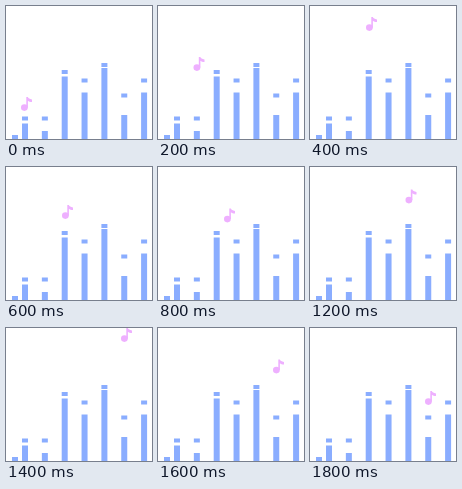
Write an HTML page that moves like this. It is 146 px wide and 133 px high and loops after 2000 ms.

```html
<!DOCTYPE html>
<html lang="en">
<head>
<meta charset="utf-8">
<title>Hopping note</title>
<style>
  html, body { margin: 0; width: 100%; height: 100%; overflow: hidden; background: #fff; }
  svg { display: block; width: 100%; height: 100%; }
  #bars { fill: #8aadff; }
  #note { fill: #eeb0ff; }
</style>
</head>
<body>
<svg viewBox="0 0 146 133">
  <g id="bars"></g>
  <g id="note">
    <ellipse cx="3.4" cy="10.6" rx="3.4" ry="3.3"/>
    <path d="M5.3 0H6.9C7.3 1.3 8.6 2.1 11 2.4V5C9.2 4.9 7.7 4.5 6.9 3.7V10.6H5.3Z"/>
  </g>
</svg>
<script>
  const FLOOR = 133, BAR = 6, CAP = 4, PITCH = 19.85;
  const STEP = 200, STEPS = 10;

  const tops = [117.5, 125, 70.5, 86.5, 62, 109, 86.5];
  const caps = [110.5, 110.5, 64, 72.5, 57, 87.5, 72.5];

  // corners of the route: the note moves straight between them
  const route = [
    { at: 0, x: 15, y: 91 },
    { at: 2, x: 56, y: 11 },
    { at: 3, x: 56, y: 38 },
    { at: 5, x: 76, y: 45 },
    { at: 7, x: 115, y: 0 },
    { at: 9, x: 115, y: 63 }
  ];

  const group = document.getElementById('bars');
  const note = document.getElementById('note');

  function rect(x, y, height) {
    const el = document.createElementNS('http://www.w3.org/2000/svg', 'rect');
    const attrs = { x, y, width: BAR, height };
    for (const key in attrs) el.setAttribute(key, attrs[key]);
    group.append(el);
  }

  function place(step) {
    const next = route.findIndex(p => p.at >= step);
    const b = route[next], a = route[next - 1] || b;
    const k = (step - a.at) / (b.at - a.at || 1);
    return [a.x + (b.x - a.x) * k, a.y + (b.y - a.y) * k];
  }

  rect(6, FLOOR - CAP, CAP);
  tops.forEach((top, i) => {
    const x = 16 + i * PITCH;
    rect(x, top, FLOOR - top);
    rect(x, caps[i], CAP);
  });

  const start = performance.now();

  function draw() {
    const step = Math.floor((performance.now() - start) / STEP) % STEPS;
    note.setAttribute('transform', `translate(${place(step)})`);
    requestAnimationFrame(draw);
  }
  draw();
</script>
</body>
</html>
```
